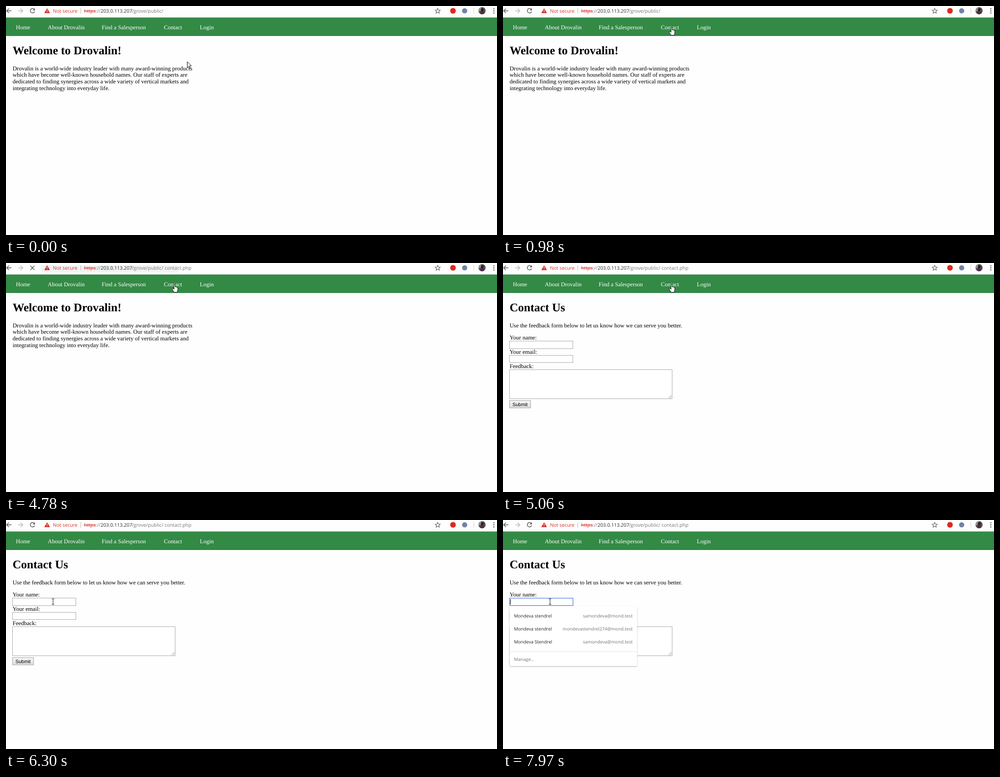
An HTML page that plays this animation: 1093 px wide and 512 px high, repeating every 8000 ms.

```html
<!DOCTYPE html>
<html lang="en">
<head>
<meta charset="utf-8">
<title>Contact form</title>
<style>
  html, body { margin: 0; width: 100%; height: 100%; overflow: hidden; background: #fefefe; }
  svg { display: block; width: 100vw; height: 100vh; }
  text { text-rendering: geometricPrecision; white-space: pre; }

  .bar { font: 10.8px "Open Sans", "Noto Sans", sans-serif; }
  .page { font: 13.02px "Liberation Serif", "Times New Roman", serif; }
  .page h1, .title { font-size: 26px; font-weight: bold; }
  .menu { font: 10px "Open Sans", "Noto Sans", sans-serif; fill: #262626; }
  .soft { fill: #757575; }
  .end { text-anchor: end; }
  .line { fill: none; stroke: #555; stroke-width: 1.5; }
  .field { fill: #fff; stroke: #a6a6a6; }
  .pointer { fill: #fff; stroke: #000; stroke-linejoin: round; }

  /* Every part switches hard on one shared 8 s clock: 1% = 80 ms. */
  .pill, .load, .idle, .file, .welcome, .form, .popup, .caret,
  .cursor, .arrow, .hand, .beam { animation: 8s step-end infinite; }

  .pill { animation-name: pill; }
  @keyframes pill {
    0% { opacity: 0 } 26.875% { opacity: .5 } 28.5% { opacity: 1 } 63.25%, 100% { opacity: 0 }
  }
  .load { animation-name: load; }
  @keyframes load { 0% { opacity: 0 } 26.875% { opacity: 1 } 63.25%, 100% { opacity: 0 } }
  .idle { animation-name: idle; }
  @keyframes idle { 0% { opacity: 1 } 26.875% { opacity: 0 } 63.25%, 100% { opacity: 1 } }
  .file { animation-name: file; }
  @keyframes file { 0% { opacity: 0 } 59.75%, 100% { opacity: 1 } }
  .welcome { animation-name: welcome; }
  @keyframes welcome { 0% { opacity: 1 } 63.25%, 100% { opacity: 0 } }
  .form { animation-name: form; }
  @keyframes form { 0% { opacity: 0 } 63.25%, 100% { opacity: 1 } }
  .popup { animation-name: popup; }
  @keyframes popup { 0% { opacity: 0 } 85.75%, 100% { opacity: 1 } }
  .caret { animation-name: caret; }
  @keyframes caret { 0% { opacity: 1 } 92.375% { opacity: 0 } 99.625%, 100% { opacity: 1 } }

  .cursor { animation-name: travel; }
  @keyframes travel {
    0% { transform: translate(403px, 124px) }
    3.625% { transform: translate(397px, 118px) }
    5.5% { transform: translate(344px, 62px) }
    7.125% { transform: translate(355px, 29px) }
    8.875% { transform: translate(374px, 42px) }
    10.625% { transform: translate(375px, 45px) }
    12.25% { transform: translate(369px, 46px) }
    70.5% { transform: translate(300px, 78px) }
    72% { transform: translate(205px, 116px) }
    73.5% { transform: translate(131px, 135px) }
    77.125% { transform: translate(109px, 160px) }
    78.75%, 100% { transform: translate(101px, 175.5px) }
  }
  .arrow { animation-name: arrow; }
  @keyframes arrow {
    0% { opacity: 1 } 8.875% { opacity: 0 } 70.5% { opacity: 1 }
    73.5% { opacity: 0 } 77.125% { opacity: 1 } 78.75%, 100% { opacity: 0 }
  }
  .hand { animation-name: hand; }
  @keyframes hand { 0% { opacity: 0 } 8.875% { opacity: 1 } 70.5%, 100% { opacity: 0 } }
  .beam { animation-name: beam; }
  @keyframes beam {
    0% { opacity: 0 } 73.5% { opacity: 1 } 77.125% { opacity: 0 } 78.75%, 100% { opacity: 1 }
  }
</style>
</head>
<body>
<svg viewBox="0 0 1093 512">
  <defs>
    <linearGradient id="key" x2="0" y2="1">
      <stop stop-color="#f6f6f6"/><stop offset="1" stop-color="#dcdcdc"/>
    </linearGradient>
    <filter id="shade" x="-5%" y="-5%" width="110%" height="115%">
      <feDropShadow dx="0" dy="1" stdDeviation="1.2" flood-opacity=".38"/>
    </filter>
    <clipPath id="round"><circle cx="1059.7" cy="10.5" r="8"/></clipPath>
  </defs>
  <rect width="1093" height="512" fill="#fefefe"/>

  <!-- Browser toolbar -->
  <g class="bar">
    <path class="pill" d="M384 5V21H85a8 8 0 0 1 0-16Z" fill="#f1f3f4"/>
    <path class="line" d="M12 10.8H1.5M6.5 5.8l-5 5 5 5"/>
    <path class="line" d="M27 10.8h10.5M32.5 5.8l5 5-5 5" style="stroke:#b9b9b9"/>
    <g class="idle">
      <path class="line" d="M62.8 7.2a5 5 0 1 0 1 5"/>
      <path d="M64.3 4.8v5h-5Z" fill="#555"/>
    </g>
    <path class="line load" d="M54.3 6.3l9 9m0-9l-9 9"/>
    <path d="M91.5 5l6.3 11H85.2Z" fill="#d93025"/>
    <path d="M91.5 8.6v3.6m0 1v1.3" stroke="#fff" stroke-width="1.2"/>
    <text x="104.5" y="14.7" fill="#d93025">Not secure</text>
    <path d="M166.5 5v12" stroke="#b5b5b5"/>
    <text x="173.5" y="14.7" fill="#d93025">https<tspan fill="#777">://</tspan></text>
    <path d="M173.5 11.5H200" stroke="#d93025"/>
    <text x="210.5" y="14.7" fill="#2b2b2b">203.0.113.207</text>
    <text x="280" y="14.7" fill="#777">/grove/public/</text>
    <text class="file" x="353" y="14.7" fill="#777">contact.php</text>

    <path d="M961 5.2l1.6 3.8 4.1.3-3.1 2.7 1 4-3.6-2.2-3.6 2.2 1-4-3.1-2.7 4.1-.3Z"
          fill="none" stroke="#555" stroke-width="1.1"/>
    <circle cx="995" cy="10.7" r="6.3" fill="#dc2a20"/>
    <circle cx="1021" cy="10.8" r="5.8" fill="#7380a8"/>
    <path d="M1041.5 4v13" stroke="#d0d0d0"/>
    <g clip-path="url(#round)">
      <rect x="1051" y="2" width="18" height="18" fill="#4b5548"/>
      <path d="M1051 2h7v8l-7 3Z" fill="#8d9689"/>
      <path d="M1056 20v-7q4-4 8 0v7Z" fill="#5b2355"/>
      <circle cx="1060" cy="8.5" r="3" fill="#2c1a2b"/>
    </g>
    <g fill="#555">
      <circle cx="1086" cy="6.2" r="1.3"/>
      <circle cx="1086" cy="10.9" r="1.3"/>
      <circle cx="1086" cy="15.6" r="1.3"/>
    </g>
  </g>

  <!-- Site navigation -->
  <rect y="25" width="1093" height="1" fill="#c3d0c6"/>
  <rect y="26" width="1093" height="41" fill="#338a45"/>
  <rect y="66" width="1093" height="1" fill="#2d7c3e"/>
  <g class="page" fill="#fff">
    <text x="22" y="51.7">Home</text>
    <text x="93" y="51.7">About Drovalin</text>
    <text x="213" y="51.7">Find a Salesperson</text>
    <text x="351.5" y="51.7">Contact</text>
    <text x="431.5" y="51.7">Login</text>
  </g>

  <g class="page welcome">
    <text class="title" x="14.7" y="108">Welcome to Drovalin!</text>
    <text x="14.7" y="143.8">Drovalin is a world-wide industry leader with many award-winning products</text>
    <text x="14.7" y="158.4">which have become well-known household names. Our staff of experts are</text>
    <text x="14.7" y="173">dedicated to finding synergies across a wide variety of vertical markets and</text>
    <text x="14.7" y="187.6">integrating technology into everyday life.</text>
  </g>

  <g class="page form">
    <text class="title" x="14.7" y="108">Contact Us</text>
    <text x="14.7" y="143.8">Use the feedback form below to let us know how we can serve you better.</text>
    <text x="14.7" y="171.4">Your name:</text>
    <rect class="field" x="14.5" y="174.5" width="141" height="17"/>
    <text x="14.7" y="203.2">Your email:</text>
    <rect class="field" x="14.5" y="206.5" width="141" height="16"/>
    <text x="14.7" y="234.8">Feedback:</text>
    <rect class="field" x="14.5" y="238.5" width="362" height="65"/>
    <path d="M368.5 302l6.5-6.5M372 302l3-3" stroke="#777" stroke-width=".9"/>
    <rect x="14.5" y="307.5" width="47" height="16.5" fill="url(#key)" stroke="#a0a0a0"/>
    <text x="21" y="319.7" style="font:10.9px 'Liberation Sans',Arial,sans-serif">Submit</text>
  </g>

  <!-- Autofill suggestions -->
  <g class="popup">
    <rect x="14.75" y="174.75" width="141" height="16.5" fill="#fff" stroke="#5a8ae0" stroke-width="1.4"/>
    <path class="caret" d="M16.5 177v12" stroke="#000"/>
    <rect x="14.5" y="192.5" width="284" height="134" rx="1.5" fill="#fff" filter="url(#shade)"/>
    <path d="M15 294h283.5" stroke="#e2e2e2"/>
    <g class="menu">
      <text x="24.5" y="217.5">Mondeva stendrel</text>
      <text x="24.5" y="247">Mondeva stendrel</text>
      <text x="24.5" y="276.4">Mondeva Stendrel</text>
      <g class="soft">
        <text class="end" x="288.5" y="217.5">samondeva@mond.test</text>
        <text class="end" x="288.5" y="247">mondevastendrel274@mond.test</text>
        <text class="end" x="288.5" y="276.4">samondeva@mond.test</text>
        <text x="24.5" y="314.6">Manage...</text>
      </g>
    </g>
  </g>

  <g class="cursor">
    <path class="pointer arrow" d="M.5.5V13.6L3.5 10.8 5.6 15.6 7.6 14.7 5.5 10H9.6Z"/>
    <path class="pointer hand" d="M5 12V2.2Q5 .6 6.2.6T7.4 2.2V7.3Q9 6.4 9.7 7.8 11.1 7.1 11.9 8.5 13.4 8.2 13.4 10V14.5L11.9 19.4H5.4L1 13Q.2 11.2 1.7 10.8 3 10.6 5 13Z"/>
    <path class="beam" d="M.7.7h2.1l.9.8.9-.8h2.1M3.7 1.2v11.6M.7 13.3h2.1l.9-.8.9.8h2.1"
          fill="none" stroke="#222" stroke-width="1.1"/>
  </g>
</svg>
</body>
</html>
```
